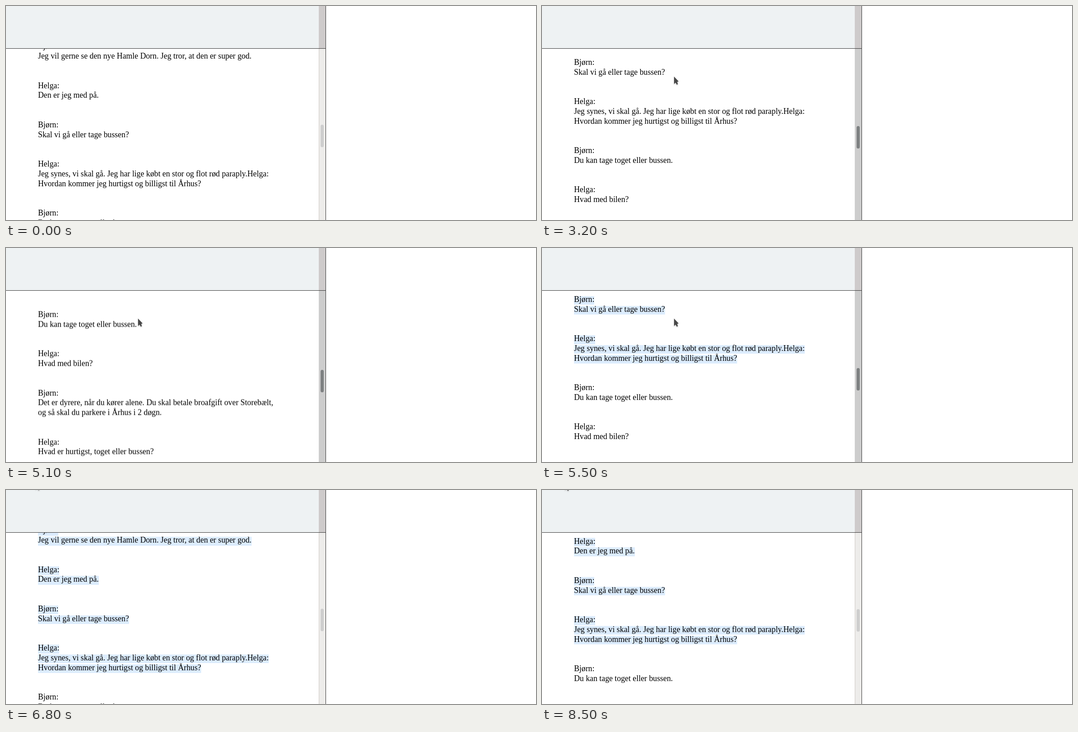
Recreate the animation shown at these times as an HTML page. Size 1176 px wide and 476 px high, loop 8.6 s.

```html
<!DOCTYPE html>
<html lang="da">
<head>
<meta charset="utf-8">
<title>Dialog</title>
<style>
  html, body { margin: 0; width: 100%; height: 100%; overflow: hidden; background: #fff; }
  #stage { position: relative; width: 1176px; height: 476px; overflow: hidden; }
  #stage div, #cursor { position: absolute; }
  #view { left: 0; top: 95px; width: 694px; height: 381px; overflow: hidden; }
  #text { left: 71px; top: 0; }
  #text div {
    height: 19.5px; line-height: 15px; white-space: pre; color: #000;
    font-family: "Liberation Serif", serif; font-size: 17.8px;
  }
  #head { left: 0; top: 0; width: 694px; height: 94px; background: #eef2f3; }
  #headBar { left: 694px; top: 0; width: 15px; height: 94px; background: #cecbcb; }
  #bar { left: 694px; top: 95px; width: 14px; height: 381px; border-left: 1px solid; }
  #thumb { left: 697.5px; top: 264px; width: 7.5px; height: 50px; border-radius: 4px; }
  #lineH { left: 0; top: 94px; width: 710px; height: 1px; background: #333; }
  #lineV { left: 709px; top: 0; width: 1px; height: 476px; background: #333; }
  #cursor { left: -4px; top: -4px; filter: drop-shadow(0 1px 1px rgba(0,0,0,.22)); }
</style>
</head>
<body>
<div id="stage">
  <div id="view"><div id="text"></div></div>
  <div id="head"></div>
  <div id="headBar"></div>
  <div id="bar"></div>
  <div id="thumb"></div>
  <div id="lineH"></div>
  <div id="lineV"></div>
  <svg id="cursor" width="20" height="28" viewBox="-4 -4 20 28">
    <path d="M0 0V16.5L3.5 13.5L6 18L8.5 17L7 12L10 10.5Z" fill="#484848"
      stroke="#fff" stroke-opacity=".75" stroke-width="1.2" paint-order="stroke"/>
  </svg>
</div>
<script>
const LOOP = 8600, PITCH = 21.81, FIRST = 95.8, ASCENT = 13.5;
const $ = id => document.getElementById(id);

// Each speech: label, then lines; two blank rows follow.
const speeches = [
  ["Bjørn:", "Jeg vil gerne se den nye Hamle Dorn. Jeg tror, at den er super god."],
  ["Helga:", "Den er jeg med på."],
  ["Bjørn:", "Skal vi gå eller tage bussen?"],
  ["Helga:", "Jeg synes, vi skal gå. Jeg har lige købt en stor og flot rød paraply.Helga:",
    "Hvordan kommer jeg hurtigst og billigst til Århus?"],
  ["Bjørn:", "Du kan tage toget eller bussen."],
  ["Helga:", "Hvad med bilen?"],
  ["Bjørn:", "Det er dyrere, når du kører alene. Du skal betale broafgift over Storebælt,",
    "og så skal du parkere i Århus i 2 døgn."],
  ["Helga:", "Hvad er hurtigst, toget eller bussen?"]
];
const SELECTED = 4;

// Time, scroll distance
const scroll = [
  [0, 0], [3200, 139], [3500, 165], [3700, 205], [3800, 241.5], [4000, 260],
  [4200, 304.5], [4500, 316.5], [5100, 312.5], [5300, 240], [5500, 150],
  [5700, 65], [6000, 13.7], [6200, 0], [7500, 6], [7700, 50.5], [7900, 63.5]
];
// Time, pointer x, y
const pointer = [
  [0, -60, -60], [700, 257, 87], [800, 276, 122], [900, 289, 148], [1000, 293, 157],
  [6400, 273, 148], [6600, 133, 0], [6800, 66, -17], [7000, 140, 158],
  [7300, 148, 184], [8100, 53, -16], [8500, 51, -16]
];
const hover = [[0, false], [800, true], [6800, false], [7000, true], [8100, false]];
const select = [[0, "transparent"], [5300, "#dcecfd"]];

// Plays a table of hard steps in an endless loop.
function play(el, steps, style) {
  const frames = steps.map(([t, ...v]) => ({ offset: t / LOOP, easing: "step-end", ...style(...v) }));
  frames.push({ ...frames[frames.length - 1], offset: 1 });
  el.animate(frames, { duration: LOOP, iterations: Infinity });
}

let row = 0;
speeches.forEach((lines, i) => {
  for (const line of lines) {
    const el = document.createElement("div");
    el.textContent = line;
    el.style.top = FIRST - 95 - ASCENT + row++ * PITCH + "px";
    $("text").append(el);
    if (i < SELECTED) play(el, select, c => ({ backgroundColor: c }));
  }
  row += 2;
});

play($("text"), scroll, d => ({ transform: `translateY(${-d}px)` }));
play($("thumb"), scroll, d => ({ transform: `translateY(${Math.round(d * 0.0217)}px)` }));
play($("cursor"), pointer, (x, y) => ({ transform: `translate(${x}px, ${y}px)` }));
play($("thumb"), hover, on => ({ backgroundColor: on ? "#7e8182" : "#cecece" }));
play($("bar"), hover, on => ({
  backgroundColor: on ? "#cdcdcd" : "#edecea",
  borderLeftColor: on ? "#cdcdcd" : "#cdc7c2"
}));
</script>
</body>
</html>
```
